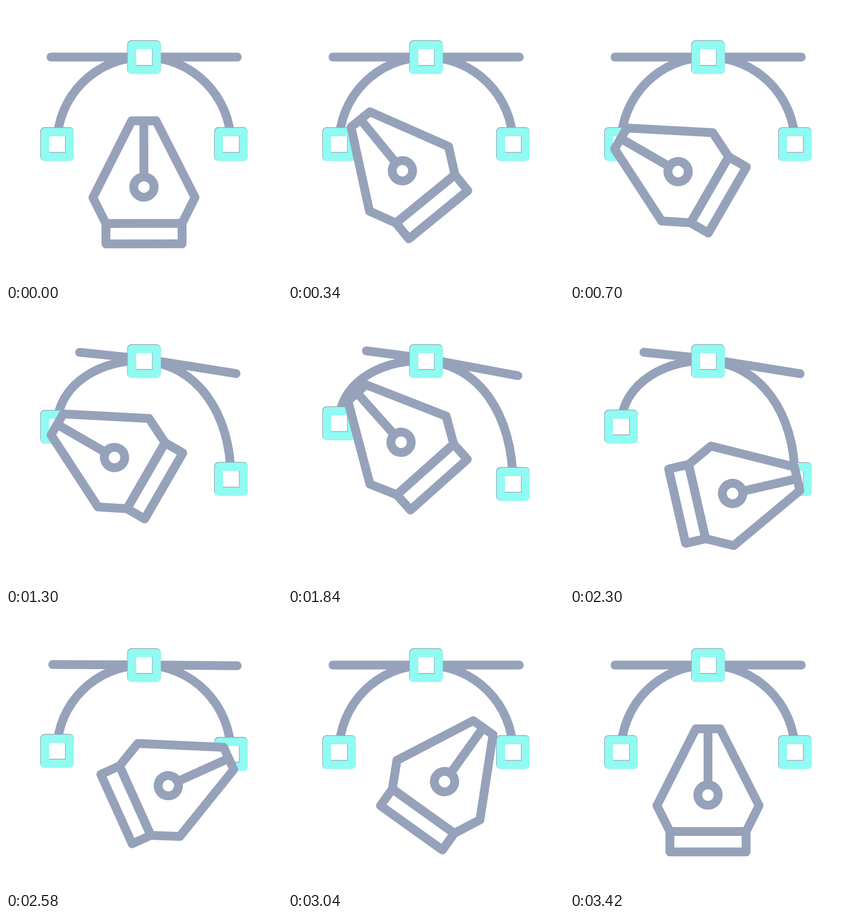
Write an HTML page that moves like this. It is 500 by 500 pixels and loops after 3.6 s.

```html
<!DOCTYPE html>
<html lang="en">
<head>
<meta charset="utf-8">
<title>Pen tool</title>
<style>
  html, body { margin: 0; width: 100%; height: 100%; overflow: hidden; background: #fff; }
  svg { display: block; width: 100vw; height: 100vh; }
  .ink { fill: none; stroke: #96a2ba; stroke-width: 16; stroke-linecap: round; stroke-linejoin: round; }
  .paper { fill: #fff; }
  .glow { fill: none; stroke: #8ffbf2; stroke-width: 15; stroke-linejoin: round; }
</style>
</head>
<body>
<svg viewBox="0 0 500 500">
  <defs>
    <g id="node">
      <rect class="ink paper" x="-22.5" y="-22.5" width="45" height="45"/>
      <rect class="glow" x="-22" y="-21.7" width="45" height="45"/>
    </g>
  </defs>
  <path id="curve" class="ink"/>
  <path id="handle" class="ink"/>
  <use href="#node" x="250" y="92.5"/>
  <use id="left" href="#node" x="92.5"/>
  <use id="right" href="#node" x="407.5"/>
  <g id="pen" class="ink">
    <path class="paper" d="M181 394L157.5 347L228 208H272L342.5 347L319 394Z"/>
    <path class="paper" d="M181 394H319V431H181Z"/>
    <path d="M250 208V310"/>
    <circle class="paper" cx="250" cy="328" r="18.5"/>
  </g>
</svg>
<script>
const LOOP = 3600;
const $ = id => document.getElementById(id);
const mix = (a, b, p) => a + (b - a) * p;

// Cubic ease with a quick start; a smaller x2 settles sooner.
function ease(t, x2) {
  if (t <= 0) return 0;
  if (t >= 1) return 1;
  const at = (s, a, b) => 3 * s * (1 - s) ** 2 * a + 3 * s * s * (1 - s) * b + s ** 3;
  let lo = 0, hi = 1;
  for (let i = 0; i < 24; i++) {
    const mid = (lo + hi) / 2;
    if (at(mid, 1 / 6, x2) < t) lo = mid; else hi = mid;
  }
  return at(lo, 1 / 6, 1);
}

// Pen poses: foot x, foot y, angle
const rest = [250, 439, 0];
const moves = [
  { from: 0, to: 700, x2: 0.6, pose: [292, 355.5, -60] },
  { from: 905, to: 1460, x2: 0.667, pose: [292.8, 317.2, -60], bend: 1 },
  { from: 1790, to: 2260, x2: 0.667, pose: [185.2, 357.2, 79], bend: 1 },
  { from: 2260, to: 2660, x2: 0.55, pose: [193.3, 356.6, 65] },
  { from: 2855, to: 3420, x2: 0.6, pose: rest }
];

function stateAt(time) {
  let pose = rest, bend = 0;
  for (const m of moves) {
    if (time < m.from) break;
    const p = ease((time - m.from) / (m.to - m.from), m.x2);
    pose = pose.map((v, i) => mix(v, m.pose[i], p));
    bend = mix(bend, m.bend || 0, p);
  }
  return { pose, bend };
}

function draw(time) {
  const { pose: [x, y, angle], bend } = stateAt(time);
  const b = (from, to) => mix(from, to, bend);
  const yl = b(250, 205), yr = b(250, 315);
  $("left").setAttribute("y", yl);
  $("right").setAttribute("y", yr);
  $("curve").setAttribute("d",
    `M92.5 ${yl}C92.5 ${b(163, 122)} ${b(163, 186)} ${b(92.5, 87)} 250 92.5` +
    `C${b(337, 345)} ${b(92.5, 99)} 407.5 ${b(163, 188)} 407.5 ${yr}`);
  $("handle").setAttribute("d",
    `M${b(81.5, 142)} ${b(92.5, 74)}L250 ${b(92.5, 88)}L${b(419, 416.5)} ${b(92.5, 119)}`);
  $("pen").setAttribute("transform",
    `translate(${x} ${y}) rotate(${angle}) translate(-250 -439)`);
}

const start = performance.now();
function tick() {
  draw((performance.now() - start) % LOOP);
  requestAnimationFrame(tick);
}
tick();
</script>
</body>
</html>
```
